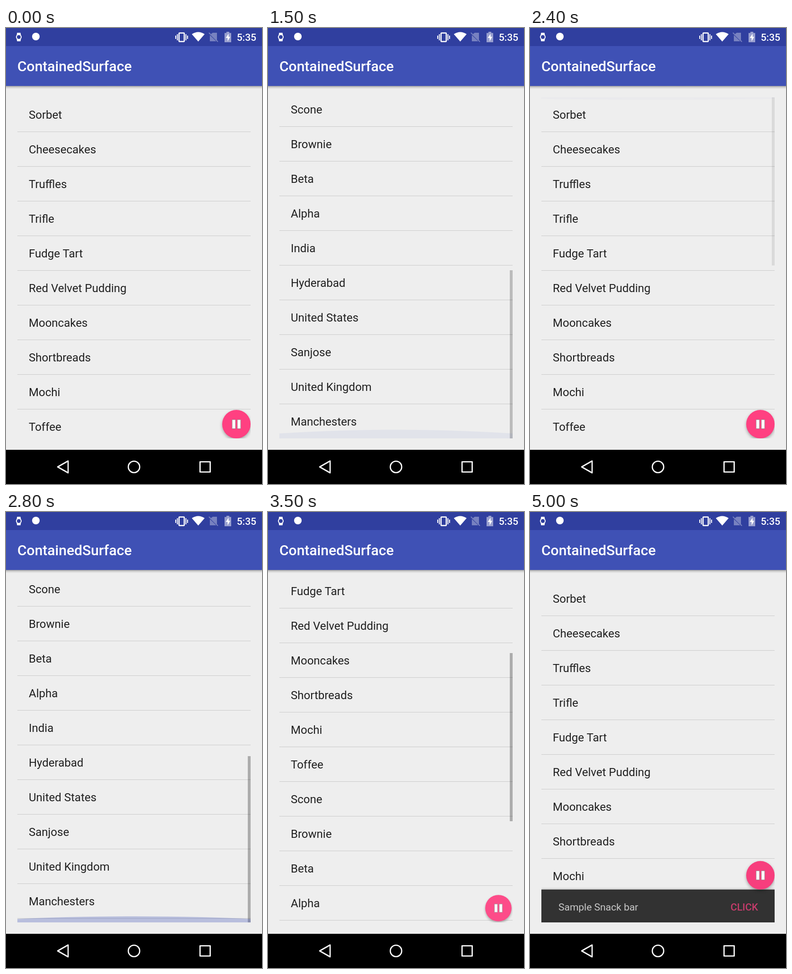
Write an HTML page that moves like this. It is 540x960 px and loops after 5.1 s.

```html
<!DOCTYPE html>
<html lang="en">
<head>
<meta charset="utf-8">
<style>
  html, body { margin: 0; width: 100%; height: 100%; overflow: hidden; background: #eee; }
  svg { display: block; font-family: Roboto, sans-serif; }
  .row { font-size: 24px; fill: #212121; }
  .medium { font-weight: 500; }
  #disc { filter: drop-shadow(0 3px 3px rgba(0, 0, 0, .32)); }
  #snack rect { filter: drop-shadow(0 -1px 2px rgba(0, 0, 0, .25)); }
</style>
</head>
<body>
<svg width="540" height="960" viewBox="0 0 540 960">
  <defs>
    <clipPath id="frame"><rect x="24" y="146" width="492" height="718"/></clipPath>
    <linearGradient id="shade" x2="0" y2="1">
      <stop stop-opacity=".32"/><stop offset=".5" stop-opacity=".1"/><stop offset="1" stop-opacity="0"/>
    </linearGradient>
  </defs>
  <rect width="540" height="960" fill="#eee"/>
  <rect y="122" width="540" height="7" fill="url(#shade)"/>
  <rect y="38" width="540" height="84" fill="#3f51b5"/>
  <rect width="540" height="38" fill="#303f9f"/>
  <text class="medium" x="24" y="91" font-size="30" fill="#fff">ContainedSurface</text>

  <g id="status" fill="#fff">
    <path d="M23.5 10h7l1 5h-9zM22.5 23h9l-1 5h-7z"/>
    <circle cx="27" cy="19" r="5" fill="#303f9f" stroke="#fff" stroke-width="2"/>
    <circle cx="63" cy="18" r="8"/>
    <rect x="365" y="10.5" width="11" height="18" rx="1" fill="none" stroke="#fff" stroke-width="2.5"/>
    <path d="M357 16h2v7h-2zM360.5 13h2v13h-2zM378.5 13h2v13h-2zM382 16h2v7h-2z"/>
    <path d="M405.5 28.5L392 13Q405.5 4 419 13Z"/>
    <g opacity=".35">
      <path d="M436 10h9v16L431.5 13.5zM430 15L443.5 28H430z"/>
      <path d="M428 10L447 29" stroke="#fff" stroke-width="1.8"/>
    </g>
    <path d="M465 8h6v2.5h4V30h-14V10.5h4z" opacity=".5"/>
    <path d="M469.5 12L463.5 21h4v7l5.5-9.5h-3.5z"/>
    <text class="medium" x="528" y="27" font-size="21" text-anchor="end">5:35</text>
  </g>

  <g clip-path="url(#frame)">
    <g id="list"></g>
    <rect id="thumb" x="510" width="6"/>
    <ellipse id="topGlow" cx="270" fill="#3f51b5" rx="738"/>
    <ellipse id="bottomGlow" cx="270" fill="#3f51b5" rx="738"/>
    <g id="snack">
      <rect x="24" y="864" width="492" height="72" fill="#323232"/>
      <g id="label" font-size="21">
        <text x="60" y="908" fill="#fff">Sample Snack bar</text>
        <text class="medium" x="481" y="908" fill="#ff4081" text-anchor="end">CLICK</text>
      </g>
    </g>
    <g id="fab">
      <circle id="disc" r="30" fill="#ff4081"/>
      <circle id="press" r="30"/>
      <path d="M-9-9.5h7v19h-7zM2-9.5h7v19h-7z" fill="#fff" stroke="#a08a90"/>
    </g>
  </g>

  <rect y="888" width="540" height="72"/>
  <g fill="none" stroke="#fff" stroke-width="2.6" stroke-linejoin="round">
    <path d="M131 911.5V936.5L109 924Z"/>
    <circle cx="270" cy="924" r="12"/>
    <rect x="409.3" y="913.3" width="21.4" height="21.4"/>
  </g>
</svg>
<script>
const LOOP = 5100, STEP = 100, TOP = 146, VIEW = 718, ROW = 73, FLING = 300, SNACK = 4812;
const names = ['Sorbet', 'Cheesecakes', 'Truffles', 'Trifle', 'Fudge Tart', 'Red Velvet Pudding',
  'Mooncakes', 'Shortbreads', 'Mochi', 'Toffee', 'Scone', 'Brownie', 'Beta', 'Alpha', 'India',
  'Hyderabad', 'United States', 'Sanjose', 'United Kingdom', 'Manchesters'];
const RANGE = names.length * ROW - 1, MAX = RANGE - VIEW;
// Moment at which each fling reaches the end of the list
const flings = [{hit: 1097, down: true}, {hit: 1880}, {hit: 2796, down: true}, {hit: 3600}];

const $ = id => document.getElementById(id);
const clamp = v => Math.min(1, Math.max(0, v));
const set = (id, attrs) => {
  for (const key in attrs) $(id).setAttribute(key, attrs[key]);
};

$('list').innerHTML = names.map((name, i) => {
  const y = TOP + i * ROW;
  return `<text class="row" x="48" y="${y + 45}">${name}</text>
    <rect x="24" y="${y + 72}" width="492" height="1" fill="#cbcbcb"/>`;
}).join('');

function bezier(x1, y1, x2, y2) {
  const at = (a, b, s) => 3 * (1 - s) ** 2 * s * a + 3 * (1 - s) * s * s * b + s ** 3;
  return v => {
    const x = clamp(v);
    let lo = 0, hi = 1;
    for (let i = 0; i < 20; i++) {
      const mid = (lo + hi) / 2;
      if (at(x1, x2, mid) < x) lo = mid; else hi = mid;
    }
    return at(y1, y2, hi);
  };
}
const fastOutSlowIn = bezier(.4, 0, .2, 1);
const slowIn = bezier(0, 0, .2, 1);
const fastOut = bezier(.4, 0, 1, 1);
const decelerate = v => 1 - (1 - clamp(v)) ** 2;

// Edge glow: a short swell after impact, then a 600 ms retreat
function drawGlow(id, t, down, peak) {
  const last = flings.filter(f => !!f.down === down && t >= f.hit).pop();
  const d = last ? t - last.hit : Infinity;
  const swell = decelerate(d / 60), left = 1 - decelerate((d - 60) / 600);
  const size = d < 60 ? swell : left;
  const offset = (738 - 99) * size;
  set(id, {
    cy: down ? TOP + VIEW + offset : TOP - offset,
    ry: 738 * size,
    opacity: d < 60 ? .3 + (peak - .3) * swell : peak * left
  });
}

// Moves list and scroll thumb; returns the scale of the round button
function drawList(t) {
  const fling = flings.filter(f => t >= f.hit - FLING).pop();
  let scroll = 0, over = 0, shift = 0, fabScale = 1, thumbAlpha = 0;
  if (fling) {
    const {hit, down} = fling, d = t - hit;
    const progress = clamp((d + FLING) / FLING) ** 1.325;
    const fabTime = (d + FLING - 70) / 200;
    scroll = MAX * (down ? progress : 1 - progress);
    if (d >= 0) over = 9 * (1 - clamp(d / 200)) ** 2;
    shift = Math.round(scroll + (down ? over : -over));
    if (down) scroll += 2 * over;
    fabScale = down ? 1 - fastOut(fabTime) : slowIn(fabTime);
    thumbAlpha = .28 * (1 - clamp((d - 345) / 250));
  }
  const range = RANGE + 2 * over;
  set('list', {transform: `translate(0 ${-shift})`});
  set('thumb', {
    y: Math.floor(TOP + VIEW * scroll / range),
    height: Math.ceil(VIEW * VIEW / range),
    opacity: thumbAlpha
  });
  drawGlow('topGlow', t, false, .33);
  drawGlow('bottomGlow', t, true, .38);
  return fabScale;
}

function draw() {
  const t = Math.floor((performance.now() + 5) % LOOP / STEP) * STEP;
  const scale = drawList(t);
  const rise = t > SNACK ? 72 * fastOutSlowIn((t - SNACK) / 250) : 0;
  const fade = clamp((t - SNACK - 70) / 180);
  set('snack', {transform: `translate(0 ${-rise})`, visibility: rise ? 'visible' : 'hidden'});
  set('label', {opacity: .5 - .5 * Math.cos(Math.PI * fade)});
  set('fab', {transform: `translate(486 ${834 - rise}) scale(${scale})`, opacity: scale});
  set('press', {opacity: .03 * clamp((t - 4650) / 100)});
  requestAnimationFrame(draw);
}
draw();
</script>
</body>
</html>
```
